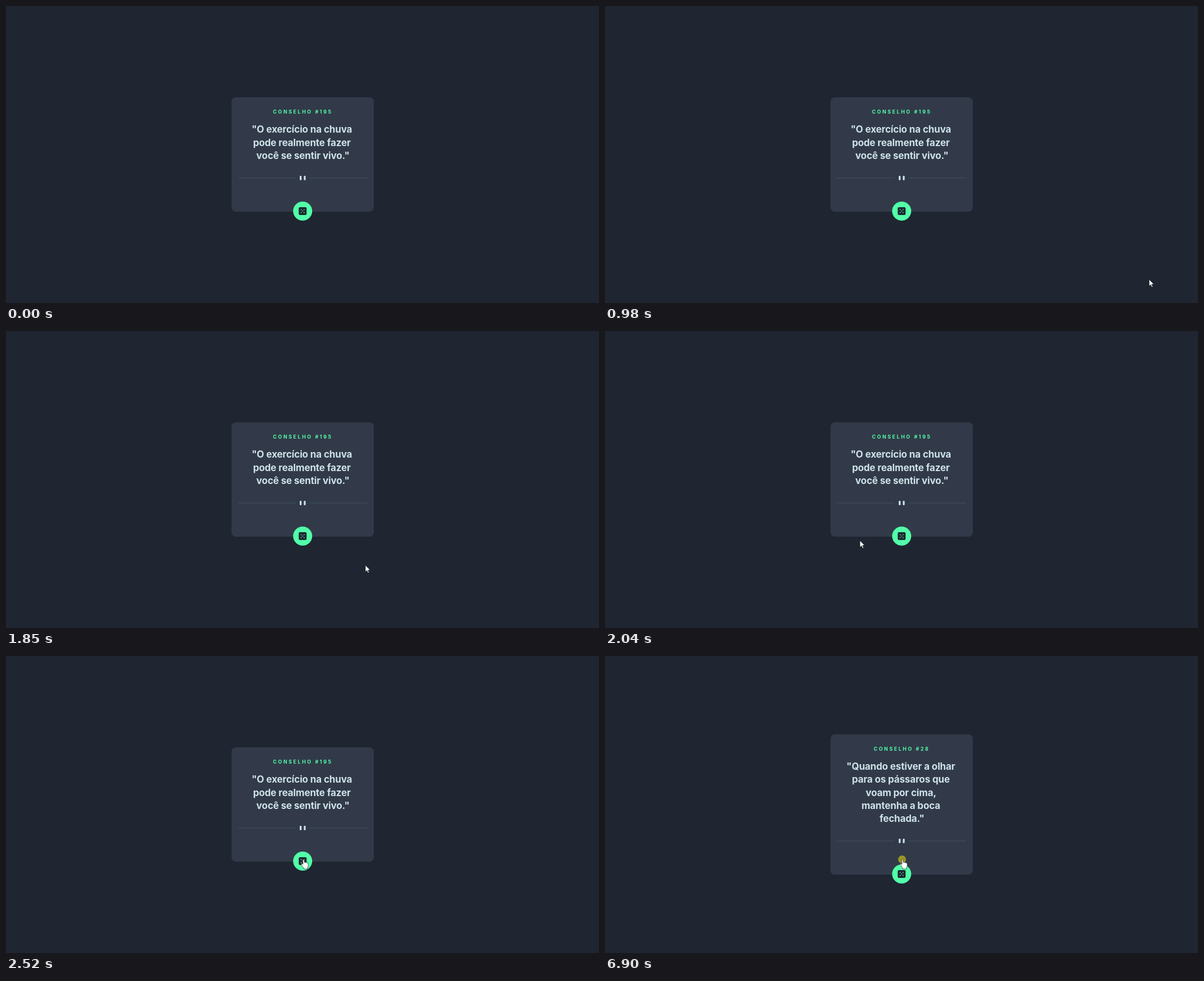
Recreate the animation shown at these times as an HTML page. Size 1056 px wide and 530 px high, loop 8 s.

```html
<!DOCTYPE html>
<html lang="pt">
<head>
<meta charset="utf-8">
<title>Conselho</title>
<style>
  html, body { margin: 0; width: 100%; height: 100%; overflow: hidden; background: #1f2631; }
  svg { display: block; width: 1056px; height: 530px; }
  text { font-family: Inter, "Open Sans", sans-serif; text-anchor: middle; }
  .card { fill: #323a49; }
  .label { font-size: 8.8px; font-weight: 700; letter-spacing: 2.62px; fill: #52ffa8; }
  .quote { font-size: 17px; font-weight: 700; letter-spacing: -.13px; fill: #cee3e9; }

  .first, .second, .press, .cursor, .arrow, .hand { animation: 8s step-end infinite; }
  .first  { animation-name: first; }
  .second { animation-name: second; }
  .press  { animation-name: press; }
  .arrow  { animation-name: arrow; }
  .hand   { animation-name: hand; }
  .cursor { animation-name: move; }

  @keyframes first  { 0% { opacity: 1 } 86.25%, 100% { opacity: 0 } }
  @keyframes second { 0% { opacity: 0 } 86.25%, 100% { opacity: 1 } }
  @keyframes press  { 0% { opacity: 0 } 54.125%, 100% { opacity: 1 } }
  @keyframes arrow  { 0% { opacity: 1 } 29.8%, 100% { opacity: 0 } }
  @keyframes hand   { 0% { opacity: 0 } 29.8%, 100% { opacity: 1 } }

  /* The pointer advances about 15 times a second. */
  @keyframes move {
    0%      { transform: translate(1080px, 550px); }
    8.125%  { transform: translate(997px, 521px); animation-timing-function: steps(2); }
    9.775%  { transform: translate(978px, 500px); animation-timing-function: steps(3); }
    12.25%  { transform: translate(969px, 488px); }
    18.875% { transform: translate(956px, 486px); animation-timing-function: steps(2); }
    20.625% { transform: translate(877.5px, 470.5px); animation-timing-function: steps(3); }
    23.125% { transform: translate(640px, 418px); animation-timing-function: steps(3); }
    25.5%   { transform: translate(454px, 374px); animation-timing-function: steps(3); }
    28.125% { transform: translate(508px, 351px); }
    29%     { transform: translate(514px, 354px); animation-timing-function: steps(3); }
    31.5%, 100% { transform: translate(529.9px, 362.7px); }
  }
</style>
</head>
<body>
<svg viewBox="0 0 1056 530">
  <defs>
    <g id="foot">
      <path d="M413.5 307H515.5M541 307H643.5" stroke="#435060"/>
      <g fill="#cee3e9">
        <rect x="523.1" y="303" width="3.2" height="8" rx="1.4"/>
        <rect x="530.4" y="303" width="3.2" height="8" rx="1.4"/>
      </g>
      <circle cx="528.3" cy="366" r="17" fill="#52ffa8"/>
      <g transform="translate(521.3 359) scale(.583)">
        <rect width="24" height="24" rx="4" fill="#1f2631"/>
        <g fill="#52ffa8">
          <circle cx="7.5" cy="7.5" r="1.5"/>
          <circle cx="16.5" cy="7.5" r="1.5"/>
          <circle cx="12" cy="12" r="1.5"/>
          <circle cx="7.5" cy="16.5" r="1.5"/>
          <circle cx="16.5" cy="16.5" r="1.5"/>
        </g>
      </g>
    </g>
  </defs>

  <g class="first">
    <rect class="card" x="401.6" y="163" width="253.4" height="204" rx="7.5"/>
    <text class="label" x="528.5" y="191.7">CONSELHO #195</text>
    <text class="quote">
      <tspan x="528.8" y="226.4">"O exercício na chuva</tspan>
      <tspan x="528.8" y="249.5">pode realmente fazer</tspan>
      <tspan x="528.8" y="272.6">você se sentir vivo."</tspan>
    </text>
    <use href="#foot"/>
  </g>

  <g class="second">
    <rect class="card" x="401.6" y="139.8" width="253.4" height="250.4" rx="7.5"/>
    <text class="label" x="528.5" y="168.6">CONSELHO #28</text>
    <text class="quote">
      <tspan x="528.8" y="203.3">"Quando estiver a olhar</tspan>
      <tspan x="528.8" y="226.4">para os pássaros que</tspan>
      <tspan x="528.8" y="249.5">voam por cima,</tspan>
      <tspan x="528.8" y="272.6">mantenha a boca</tspan>
      <tspan x="528.8" y="295.7">fechada."</tspan>
    </text>
    <use href="#foot" y="23"/>
  </g>

  <circle class="press" cx="529" cy="363" r="7" fill="#fff000" fill-opacity=".5"/>

  <g class="cursor" fill="#fff" stroke="#11151c" stroke-width=".7" stroke-linejoin="round">
    <path class="arrow" d="M0 0V12L2.8 9.4L4.6 13.7L6.5 12.9L4.7 8.7H8.5Z"/>
    <path class="hand" d="M-1.2 1.2Q0 -1.2 1.3 1.2V5.4Q2.6 4.5 3.7 5.8Q5 5 6 6.4Q8.3 5.8 8.3 8.2V11.5Q8.2 13.6 6.8 15V17.2H.2V15.4Q-1.8 13.5 -2.7 11.2L-4.3 9Q-4.6 7.2 -2.9 7.5L-1.2 9Z"/>
  </g>
</svg>
</body>
</html>
```
